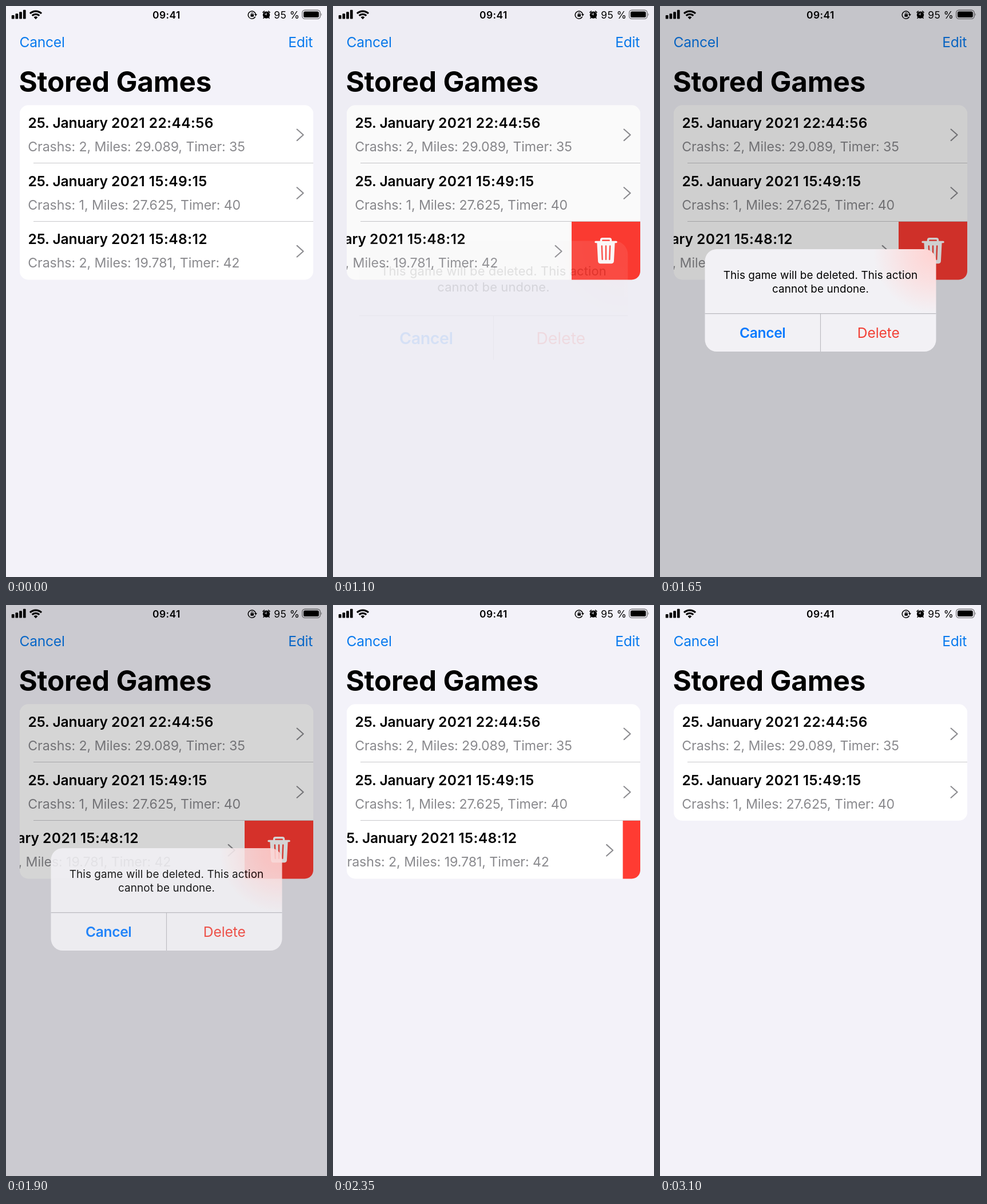
These frames come from a looping animation (561 px wide and 998 px high, 3150 ms). An HTML page:

```html
<!DOCTYPE html>
<html lang="en">
<head>
<meta charset="utf-8">
<title>Stored Games</title>
<style>
  html, body { margin: 0; width: 100%; height: 100%; overflow: hidden; background: #f3f2f9; }
  svg { display: block; width: 561px; height: 998px; font: 24.6px Inter, "Liberation Sans", sans-serif; font-optical-sizing: none; }
  .title { font-size: 49.3px; font-weight: 700; letter-spacing: -.16px; }
  .link { fill: #087aee; letter-spacing: -.25px; }
  .date { font-weight: 600; letter-spacing: -.1px; }
  .digits { letter-spacing: .43px; }
  .info { font-size: 23.2px; fill: #8a8a8e; letter-spacing: -.09px; }
  .status { font-size: 17.4px; letter-spacing: .45px; }
  .message { font-size: 18.87px; letter-spacing: .11px; }
  .line { stroke: #c8c8cb; stroke-width: 1; }
  .chevron { fill: none; stroke: #8c8c90; stroke-width: 2.1; stroke-linecap: round; stroke-linejoin: round; }
  .mid { text-anchor: middle; }
</style>
</head>
<body>
<svg viewBox="0 0 561 998">
  <defs>
    <clipPath id="cardClip"><rect id="card" x="24" y="173.5" width="513" height="305" rx="15"/></clipPath>
    <radialGradient id="glow" gradientUnits="userSpaceOnUse" cx="478" cy="432" r="105">
      <stop offset="0" stop-color="#ffd3d2"/>
      <stop offset=".45" stop-color="#fadfe0"/>
      <stop offset="1" stop-color="#f2f1f5"/>
    </radialGradient>
  </defs>
  <rect width="561" height="998" fill="#f3f2f9"/>

  <!-- status bar -->
  <g id="bars"></g>
  <g fill="none" stroke="#000" stroke-width="3.2">
    <path d="M42 13.2a14.2 14.2 0 0 1 20 0M45.7 16.9a9 9 0 0 1 12.6 0"/>
    <path d="M52 23.2l-3.4-3.5a4.8 4.8 0 0 1 6.8 0z" fill="#000" stroke="none"/>
  </g>
  <text class="status mid" x="280.5" y="21.8" font-weight="600">09:41</text>
  <path d="M435.7 18.6a6.6 6.6 0 1 1 .7-3.3" fill="none" stroke="#000" stroke-width="1.4"/>
  <path d="M433.8 14.3h5.2l-2.6 3.4z"/>
  <rect x="427.4" y="14.3" width="5.6" height="4.4" rx=".8"/>
  <path d="M428.6 14.5v-1.2a1.6 1.6 0 0 1 3.2 0v1.2" fill="none" stroke="#000" stroke-width="1"/>
  <circle cx="455" cy="15.6" r="6.2"/>
  <path d="M449 11.2l2.4-2.2M461 11.2l-2.4-2.2M451 20l-1 1.3M459 20l1 1.3" stroke="#000" stroke-width="1.6" stroke-linecap="round"/>
  <path d="M452 13.6l3 2.2v-4" fill="none" stroke="#f3f2f9" stroke-width="1"/>
  <text class="status" x="468.3" y="21.8">95 %</text>
  <rect x="517.7" y="7.2" width="31.4" height="15.2" rx="4.6" fill="none" stroke="#77767a" stroke-width="1.4"/>
  <rect x="520" y="9.5" width="26.8" height="10.6" rx="2.7"/>
  <path d="M550.6 12.2q2.3 2.6 0 5.2z" fill="#77767a"/>

  <text class="link" x="23.5" y="72">Cancel</text>
  <text class="link" x="536" y="72" text-anchor="end">Edit</text>
  <text class="title" x="22.5" y="150">Stored Games</text>

  <g clip-path="url(#cardClip)">
    <rect x="24" y="173" width="513" height="306" fill="#fff"/>
    <g id="lastRow">
      <rect x="537" y="377" width="600" height="102" fill="#ff3b32"/>
      <g fill="none" stroke="#fff" stroke-width="3.4" stroke-linecap="round" stroke-linejoin="round">
        <path d="M579 412.5h36M588.5 411v-1.6q0-2.6 2.6-2.6h11.8q2.6 0 2.6 2.6v1.6"/>
        <path d="M582.6 414l1.7 32q.2 3 3 3h19.4q2.8 0 3-3l1.7-32z" fill="#fff" stroke-width="2.4"/>
        <path d="M589.8 419.5l.9 23.5M597 419.5v23.5M604.2 419.5l-.9 23.5" stroke="#ff3b32" stroke-width="2.3"/>
      </g>
    </g>
    <rect x="24" y="173" width="513" height="203.5" fill="#fff"/>
    <g id="rows"></g>
    <path class="line" d="M48 274.5H537"/>
    <line class="line" id="lowerLine" y1="376.5" y2="376.5"/>
  </g>

  <rect id="dim" width="561" height="998"/>
  <g id="alert">
    <rect x="78.5" y="425" width="404" height="179" rx="20.5" fill="url(#glow)"/>
    <path d="M78.5 537.6h404M280.5 537.6V604" stroke="#b9b9be" stroke-width="1.1"/>
    <text class="message mid" x="280.5" y="477.2">This game will be deleted. This action</text>
    <text class="message mid" x="280.5" y="501.2">cannot be undone.</text>
    <text class="mid" x="179.2" y="580" fill="#0a7aff" font-weight="600" letter-spacing="-.35">Cancel</text>
    <text class="mid" x="381.8" y="580" fill="#f24137" letter-spacing="-.1">Delete</text>
  </g>
</svg>
<script>
const $ = id => document.getElementById(id);
const set = (id, attrs) => {
  for (const k in attrs) $(id).setAttribute(k, attrs[k]);
};
const PITCH = 101.7, LOOP = 3150;

$("bars").innerHTML = [16, 13.3, 10.3, 6.8].map((y, i) =>
  `<rect x="${9.8 + i * 6.7}" y="${y}" width="4.7" height="${22.6 - y}" rx="1.2"/>`).join("");

const rowMarkup = (i, time, info) => {
  const y = i * PITCH;
  return `<text class="date" x="38.5" y="${213 + y}">25. January <tspan class="digits">2021 ${time}</tspan></text>
    <text class="info" x="38.2" y="${253.8 + y}">${info}</text>
    <path class="chevron" d="M508.6 ${215.5 + y}l11 9.8-11 9.8"/>`;
};
$("rows").innerHTML =
  rowMarkup(0, "22:44:56", "Crashs: 2, Miles: 29.089, Timer: 35") +
  rowMarkup(1, "15:49:15", "Crashs: 1, Miles: 27.625, Timer: 40");
$("lastRow").insertAdjacentHTML("beforeend",
  rowMarkup(2, "15:48:12", "Crashs: 2, Miles: 19.781, Timer: 42"));

const ramp = (t, from, to) => Math.min(1, Math.max(0, (t - from) / (to - from)));
const easeInOut = u => u < .5 ? 2 * u * u : 1 - 2 * (1 - u) ** 2;
const easeOut = u => 1 - (1 - u) ** 3;
const spring = ms => {
  const x = Math.max(0, ms) * .0266;
  return 1 - (1 + x) * Math.exp(-x);
};

function draw(t) {
  // swipe open, swipe closed, then collapse
  const swipe = 120 * (easeInOut(ramp(t, 200, 580)) - easeOut(ramp(t, 2240, 2540)));
  const gone = easeInOut(ramp(t, 2555, 2750));
  set("lastRow", {
    transform: `translate(${-swipe} ${-PITCH * gone})`,
    opacity: Math.max(0, 1 - 1.3 * gone)
  });
  set("card", { height: 305 - PITCH * gone });
  set("lowerLine", { x1: 48 - 30 * gone, x2: 537 - 130 * gone, opacity: 1 - gone });

  // the alert shrinks in and only fades out
  const closing = t >= 1877;
  const shown = closing ? 1 - spring(t - 1877) : spring(t - 1080);
  const scale = closing ? 1 : 1.18 - .18 * shown;
  set("dim", { opacity: .19 * shown });
  set("alert", {
    opacity: shown,
    transform: `translate(280.5 514.5) scale(${scale}) translate(-280.5 -514.5)`
  });
}

const start = performance.now();
function tick() {
  const t = (performance.now() - start) % LOOP;
  draw(Math.floor(t / 50) * 50);
  requestAnimationFrame(tick);
}
tick();
</script>
</body>
</html>
```
